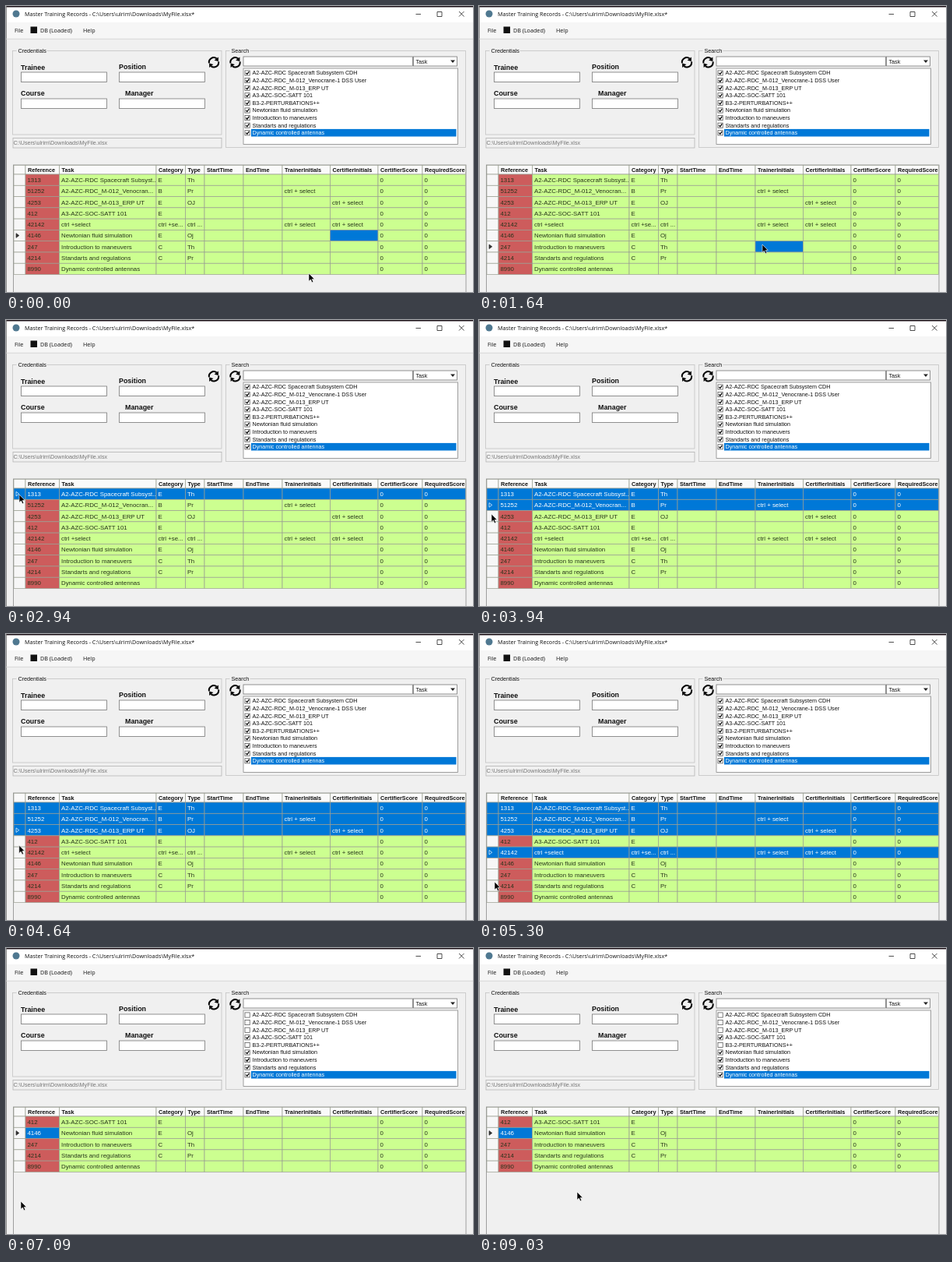
Write an HTML page that moves like this. It is 600x367 px and loops after 9.06 s.

```html
<!DOCTYPE html>
<html lang="en">
<head>
<meta charset="utf-8">
<title>Training records</title>
<style>
html, body { margin: 0; width: 100%; height: 100%; overflow: hidden; background: #f0f0f0; }
svg { display: block; width: 100%; height: 100%; }
text { font: 7.2px "Liberation Sans", Arial, sans-serif; fill: #111; white-space: pre; }
.ui { font: 7.2px "Open Sans", sans-serif; }
.label { font-weight: bold; font-size: 8.9px; }
.head { font-weight: bold; font-size: 7.25px; }
.cell { font-size: 7.85px; fill: #26331a; }
.dim { fill: #777; }
.on { fill: #fff; }
</style>
</head>
<body>
<svg id="stage" viewBox="0 0 600 367" xmlns="http://www.w3.org/2000/svg">
  <g id="frame"></g>
  <g id="list"></g>
  <g id="grid"></g>
  <path id="cursor" d="M0 0V10.2L2.4 8L4.1 11.8L5.8 11L4.2 7.4H7.3Z" fill="#000" stroke="#fff" stroke-width=".6"/>
</svg>
<script>
const LOOP = 9060, BLUE = '#0078d7', GREEN = '#ccff90', RED = '#cd5c5c', LINE = '#9a9f92';
const $ = id => document.getElementById(id);

const rect = (x, y, w, h, fill, stroke = 'none', sw = .8) =>
  `<rect x="${x}" y="${y}" width="${w}" height="${h}" fill="${fill}" stroke="${stroke}" stroke-width="${sw}"/>`;
const text = (x, y, str, cls = '') => `<text x="${x}" y="${y}" class="${cls}">${str}</text>`;
const path = (d, stroke, sw = .8, fill = 'none') =>
  `<path d="${d}" fill="${fill}" stroke="${stroke}" stroke-width="${sw}"/>`;

const FILE = 'C:\\Users\\ulrim\\Downloads\\MyFile.xlsx';
const COLS = [
  ['Reference', 25], ['Task', 68.5], ['Category', 193], ['Type', 230.5], ['StartTime', 255],
  ['EndTime', 305], ['TrainerInitials', 355], ['CertifierInitials', 416.5],
  ['CertifierScore', 478], ['RequiredScore', 535]
];
const RIGHT = 590.5, TOP = 216, ROW = 14.28;
const CTRL = 'ctrl + select';
const ROWS = [
  ['1313', 'A2-AZC-RDC Spacecraft Subsyst...', 'E', 'Th'],
  ['51252', 'A2-AZC-RDC_M-012_Venocran...', 'B', 'Pr', '', '', CTRL],
  ['4253', 'A2-AZC-RDC_M-013_ERP UT', 'E', 'OJ', '', '', '', CTRL],
  ['412', 'A3-AZC-SOC-SATT 101', 'E'],
  ['42142', 'ctrl +select', 'ctrl +se...', 'ctrl ...', '', '', CTRL, CTRL],
  ['4146', 'Newtonian fluid simulation', 'E', 'Oj'],
  ['247', 'Introduction to maneuvers', 'C', 'Th'],
  ['4214', 'Standarts and regulations', 'C', 'Pr'],
  ['8990', 'Dynamic controlled antennas']
];
const TASKS = [
  'A2-AZC-RDC Spacecraft Subsystem CDH', 'A2-AZC-RDC_M-012_Venocrane-1 DSS User',
  'A2-AZC-RDC_M-013_ERP UT', 'A3-AZC-SOC-SATT 101', 'B3-2-PERTURBATIONS++',
  'Newtonian fluid simulation', 'Introduction to maneuvers',
  'Standarts and regulations', 'Dynamic controlled antennas'
];
const REMOVED = [0, 1, 2, 4];

// Grid states: start time, current row, selected column or selected rows
const STEPS = [
  { at: 0, row: 5, col: 7 },
  { at: 1290, row: 6, col: 6 },
  { at: 2700, row: 0, rows: [0] },
  { at: 3450, row: 1, rows: [0, 1] },
  { at: 4170, row: 2, rows: [0, 1, 2] },
  { at: 4920, row: 4, rows: REMOVED },
  { at: 6720, row: 5, col: 0, removed: true }
];

// Cursor: time, x, y
const MOVES = [
  [0, 389, 343], [330, 389, 343], [1240, 364, 306], [1900, 364, 306], [2640, 17, 224],
  [3060, 17, 224], [3450, 17, 236], [3900, 16, 249], [4200, 16, 250], [4850, 17, 278],
  [4980, 17, 281], [5290, 20, 318], [5600, 19, 325], [7700, 19, 325], [8700, 126, 313], [LOOP, 126, 313]
];

function group(x, y, w, h, title, tw) {
  return rect(x, y, w, h, 'none', '#c4c4c4') + rect(x + 5, y - 3, tw, 6, '#f0f0f0') + text(x + 7, y + 2, title);
}

function field(x, y, label, lx, ly) {
  return text(lx, ly, label, 'label') + rect(x, y, 110, 12.5, '#fff', '#777');
}

function refresh(x, y) {
  const half = path('M-6.1 1A6.1 6.1 0 0 1 3.6 -4.9', '#000', 2) +
    path('M5.9 -6.8V-1.2L.6 -2.6Z', 'none', 0, '#000');
  return `<g transform="translate(${x} ${y})">${half}<g transform="rotate(180)">${half}</g></g>`;
}

function drawFrame() {
  $('frame').innerHTML =
    rect(0, 0, 600, 367, '#f0f0f0') + rect(0, 0, 600, 21, '#fff') + rect(0, 21, 600, 21, '#f6f6f6') +
    rect(0, 0, 600, 1.5, '#1c1218') + rect(0, 0, .8, 367, '#777') +
    path('M0 42.3H600', '#d2d2d2') +
    '<circle cx="13" cy="10" r="4.5" fill="#4f7890"/>' +
    text(24, 12.8, `Master Training Records - ${FILE}*`, 'ui') +
    path('M526.5 10.5H533M554 7.5H560V13.5H554ZM582 7L588.5 13.5M588.5 7L582 13.5', '#222') +
    text(11, 33.5, 'File', 'ui') + rect(31.5, 26.5, 8.5, 8.5, '#111') +
    text(44, 33.5, 'DB (Loaded)', 'ui') + text(99, 33.5, 'Help', 'ui') +
    group(8.5, 57.5, 268.5, 107.5, 'Credentials', 39) +
    field(19.5, 85, 'Trainee', 19, 81.5) + field(145.5, 85, 'Position', 145, 80.8) +
    field(19.5, 119, 'Course', 19, 115.2) + field(145.5, 119, 'Manager', 153, 115.2) +
    rect(9, 169.5, 268, 12.5, '#f0f0f0', '#b4b4b4') + text(9.5, 178.2, FILE, 'dim') +
    group(282.5, 57.5, 308, 124, 'Search', 26) +
    refresh(267, 72.3) + refresh(294.5, 72.3) +
    rect(305, 65, 217.5, 12, '#fff', '#777') + rect(523.5, 65, 56, 12, '#fff', '#777') +
    text(526.5, 73.5, 'Task') + path('M571 69.5H577L574 73Z', 'none', 0, '#222') +
    rect(305, 80, 275.5, 97.5, '#fff', '#888');
}

function drawList(removed) {
  $('list').innerHTML = TASKS.map((task, i) => {
    const y = 85.9 + i * 9.6, last = i === TASKS.length - 1;
    const ticked = !(removed && REMOVED.includes(i));
    return (last ? rect(315, y - 4.8, 263.5, 9.6, BLUE) : '') +
      rect(307, y - 3, 6.2, 6.2, '#fff', '#444', .7) +
      (ticked ? path(`M308.3 ${y}l1.5 1.7l2.5 -3.6`, '#000', 1.2) : '') +
      text(316.5, y + 2.5, task, last ? 'on' : '');
  }).join('');
}

function drawRow(cells, index, slot, step) {
  const y = TOP + slot * ROW, mid = y + ROW / 2;
  const whole = !!step.rows && step.rows.includes(index), current = index === step.row;
  let out = rect(10, y, 15, ROW, whole ? BLUE : '#f7f7f7', LINE, .7);
  if (current)
    out += path(`M13 ${mid - 2.8}L16.8 ${mid}L13 ${mid + 2.8}Z`, whole ? '#fff' : '#333', .7, whole ? 'none' : '#333');
  COLS.forEach(([, x], c) => {
    const end = c + 1 < COLS.length ? COLS[c + 1][1] : RIGHT;
    const on = whole || (current && step.col === c);
    out += rect(x, y, end - x, ROW, on ? BLUE : c ? GREEN : RED, LINE, .7);
    const str = c > 7 ? '0' : cells[c];
    if (str) out += text(x + 2.5, mid + 2.8, str, on ? 'cell on' : 'cell');
  });
  return out;
}

function drawGrid(step) {
  let out = rect(9.5, 204, RIGHT - 9, 164, '#f0f0f0', '#8a8a8a') +
    rect(10, 204.3, 15, 11.7, '#fafafa', LINE, .7);
  COLS.forEach(([name, x], c) => {
    const end = c + 1 < COLS.length ? COLS[c + 1][1] : RIGHT;
    out += rect(x, 204.3, end - x, 11.7, '#fafafa', LINE, .7) + text(x + 3, 213.2, name, 'head');
  });
  let slot = 0;
  ROWS.forEach((cells, i) => {
    if (!(step.removed && REMOVED.includes(i))) out += drawRow(cells, i, slot++, step);
  });
  $('grid').innerHTML = out;
}

function cursorAt(t) {
  const i = MOVES.findIndex(m => m[0] > t);
  const [t0, x0, y0] = MOVES[i - 1], [t1, x1, y1] = MOVES[i];
  const p = (t - t0) / (t1 - t0), e = p * p * (3 - 2 * p);
  return [x0 + (x1 - x0) * e, y0 + (y1 - y0) * e];
}

let shown;
function render(now) {
  const t = (now - start + LOOP) % LOOP;
  const step = STEPS.filter(s => s.at <= t).pop();
  if (step !== shown) {
    drawList(step.removed);
    drawGrid(step);
    shown = step;
  }
  $('cursor').setAttribute('transform', `translate(${cursorAt(t).join(' ')})`);
  requestAnimationFrame(render);
}

drawFrame();
const start = performance.now();
render(start);
</script>
</body>
</html>
```
